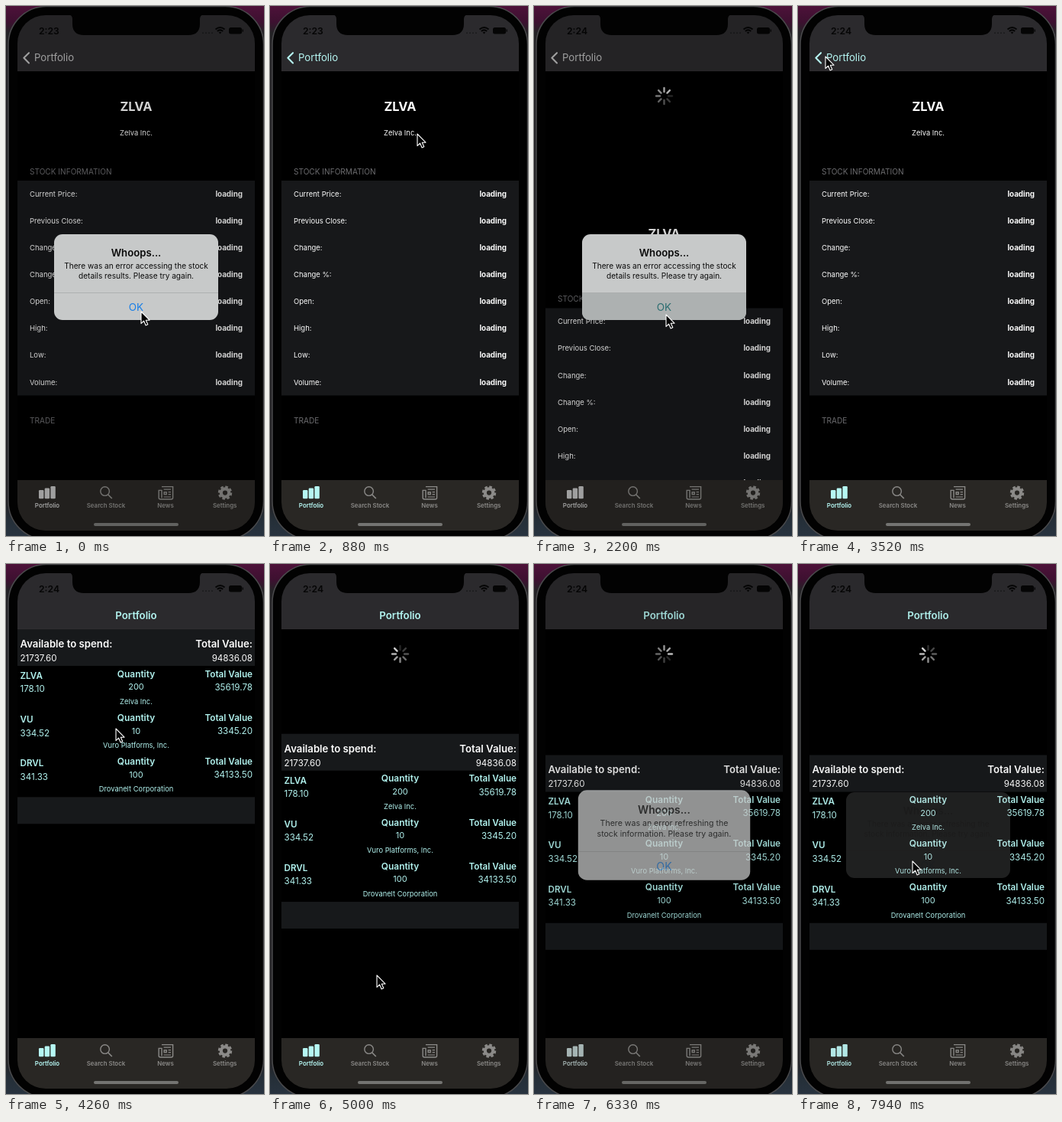
Animation of 338 by 692 pixels, one loop 8000 ms. Source, as an HTML page:

```html
<!DOCTYPE html>
<html lang="en">
<head>
<meta charset="utf-8">
<title>Stock portfolio</title>
<style>
  html, body { margin: 0; width: 100%; height: 100%; overflow: hidden; background: #000; }
  svg { display: block; width: 338px; height: 692px; --tint: #b6f7f3; }
  text { font-family: Inter, "Open Sans", sans-serif; fill: #fcfcfc; white-space: pre; }
  .mid { text-anchor: middle; }
  .end { text-anchor: end; }
  .semi { font-weight: 600; }
  .bold { font-weight: 700; }
  .cyan { fill: #b2f3ef; }
  .dark { fill: #0b0b0b; }
  .muted { fill: #6d6d70; }
  .idle { fill: #8b8a88; }
  .tint { fill: var(--tint); }
  .line { fill: none; stroke: #8b8a88; stroke-width: 1.4; }
</style>
</head>
<body>
<svg viewBox="0 0 338 692">
  <defs>
    <linearGradient id="wall" x2="0" y2="1">
      <stop offset="0" stop-color="#4d1239"/>
      <stop offset=".03" stop-color="#3d1030"/>
      <stop offset=".05" stop-color="#242326"/>
      <stop offset=".94" stop-color="#242326"/>
      <stop offset=".97" stop-color="#252f38"/>
      <stop offset="1" stop-color="#28333f"/>
    </linearGradient>
    <clipPath id="screen"><rect x="15" y="12" width="311" height="673" rx="37"/></clipPath>
  </defs>

  <rect width="338" height="692" fill="url(#wall)"/>
  <rect x="3" y=".5" width="334.5" height="696" rx="50" fill="#020202" stroke="#4a4a4c" stroke-width="1.5"/>

  <g clip-path="url(#screen)">
    <rect x="15" y="12" width="311" height="673"/>
    <g id="portfolio"></g>
    <g id="detail"></g>
    <g id="spinner" transform="translate(170.5 117.5)"></g>

    <rect x="15" y="12" width="311" height="73" fill="#2b2a2d"/>
    <path d="M15 84.8H326" stroke="#3a393b" stroke-width=".5"/>
    <g id="back">
      <path d="M30 61.2L23.4 67.8L30 74.4" fill="none" stroke="var(--tint)" stroke-width="2.1" stroke-linecap="round" stroke-linejoin="round"/>
      <text class="tint" x="37" y="72.4" font-size="13.2">Portfolio</text>
    </g>
    <text id="title" class="mid semi cyan" y="72.4" font-size="13.3">Portfolio</text>

    <text id="clock" class="semi" x="43" y="36.8" font-size="12.2" style="fill:#050505"></text>
    <path d="M257 35.3H271" stroke="#1a1a1c" stroke-width="1.4" stroke-dasharray="2 2"/>
    <g fill="none" stroke="#050505" stroke-width="2">
      <path d="M274.5 30.6Q280.5 25.4 286.5 30.6M276.8 33Q280.5 29.8 284.2 33"/>
      <path d="M280.5 36.4L278.7 34.4Q280.5 33.2 282.3 34.4Z" fill="#050505" stroke="none"/>
    </g>
    <rect x="292" y="28" width="17" height="8.4" rx="2.5" fill="#050505"/>
    <path d="M310.2 30.6v3.2" stroke="#050505" stroke-width="1.3"/>

    <rect x="15" y="619" width="311" height="66" fill="#292724"/>
    <g class="tint">
      <rect x="43" y="632" width="6.4" height="11.2" rx="1.3"/>
      <rect x="50.7" y="629.4" width="6.4" height="13.8" rx="1.3"/>
      <rect x="58.4" y="627" width="6.4" height="16.2" rx="1.3"/>
    </g>
    <g class="line">
      <circle cx="129.6" cy="633.6" r="5.8"/>
      <path d="M133.8 638L138.8 643" stroke-width="1.7"/>
      <path d="M204 627.6H218.6V642Q218.6 644 216.6 644H202.2Q200.2 644 200.2 642V632.4H204V642.2"/>
      <path d="M206.6 631.2H216M206.6 641H216M212.6 634.6H216M212.6 637.7H216" stroke-width="1.2"/>
      <rect x="207.2" y="634.8" width="3" height="2.8"/>
      <circle cx="287" cy="635.6" r="5.2" stroke-width="4.2"/>
      <circle cx="287" cy="635.6" r="7.9" stroke-width="2.6" stroke-dasharray="3.6 2.605"/>
    </g>
    <g id="tabs"></g>
    <rect x="115" y="675" width="111" height="4" rx="2" fill="#747472"/>

    <rect id="dim" x="15" y="12" width="311" height="673"/>
  </g>

  <path d="M82 11H259Q254 12 254 17V23Q254 38 239 38H102Q87 38 87 23V17Q87 12 82 11Z" fill="#020202"/>

  <g id="alert">
    <rect x="63" y="298" width="215" height="112" rx="11" fill="#c7c9c9"/>
    <g id="content">
      <path id="press" d="M63 374.5H278V399Q278 410 267 410H74Q63 410 63 399Z" fill="#adb1b1"/>
      <path d="M63 374.5H278" stroke="#a9abab" stroke-width=".8"/>
      <text class="mid semi dark" x="170.5" y="327" font-size="13.2">Whoops...</text>
      <text id="line1" class="mid dark" x="170.5" y="342.8" font-size="10.1"></text>
      <text id="line2" class="mid dark" x="170.5" y="355.8" font-size="10.1"></text>
      <text id="ok" class="mid" x="170.5" y="398" font-size="13.5">OK</text>
    </g>
  </g>

  <path id="cursor" d="M0 0V15.6L3.6 12.2L6.1 18L8.8 16.8L6.3 11.2H11Z" fill="#050505" stroke="#fff" stroke-width="1.1" stroke-linejoin="round"/>
</svg>

<script>
const $ = id => document.getElementById(id);
const text = (x, y, size, cls, str) =>
  `<text x="${x}" y="${y}" font-size="${size}" class="${cls}">${str}</text>`;
const panel = (y, height, fill) =>
  `<rect x="15" y="${y}" width="311" height="${height}" fill="${fill}"/>`;

function buildDetail() {
  const labels = ['Current Price', 'Previous Close', 'Change', 'Change %', 'Open', 'High', 'Low', 'Volume'];
  const rows = labels.map((label, i) =>
    text(31, 248.8 + i * 35.1, 9.5, '', label + ':') +
    text(310, 248.8 + i * 35.1, 9.8, 'end bold', 'loading'));
  $('detail').innerHTML = panel(85, 600, '#000') + '<g class="scroll">' +
    text(170.5, 136.6, 16.4, 'mid bold', 'ZLVA') +
    text(170.5, 169.2, 9.4, 'mid', 'Zelva Inc.') +
    text(31, 219.8, 10.1, 'muted', 'STOCK INFORMATION') +
    panel(228, 280.5, '#17181a') + rows.join('') +
    text(31, 545.2, 10.1, 'muted', 'TRADE') + '</g>';
}

function buildPortfolio() {
  const stocks = [
    ['ZLVA', '178.10', '200', '35619.78', 'Zelva Inc.'],
    ['VU', '334.52', '10', '3345.20', 'Vuro Platforms, Inc.'],
    ['DRVL', '341.33', '100', '34133.50', 'Drovanelt Corporation']
  ];
  const rows = stocks.map(([ticker, price, count, total, name], i) => {
    const y = 133 + i * 57.2;
    return text(18.5, y + 16.8, 11.7, 'semi cyan', ticker) +
      text(18.5, y + 34.3, 11.6, 'cyan', price) +
      text(170.5, y + 14.6, 11.9, 'mid semi cyan', 'Quantity') +
      text(170.5, y + 31.3, 11, 'mid cyan', count) +
      text(323, y + 14.6, 11.7, 'end semi cyan', 'Total Value') +
      text(323, y + 32, 11.6, 'end cyan', total) +
      text(170.5, y + 49.8, 9.35, 'mid cyan', name);
  });
  $('portfolio').innerHTML = '<g class="scroll">' + panel(85, 48, '#17191b') +
    text(18.5, 108.8, 13.2, 'semi', 'Available to spend:') +
    text(323, 108.8, 13.2, 'end semi', 'Total Value:') +
    text(18.5, 126.8, 11.6, '', '21737.60') +
    text(323, 126.8, 11.6, 'end', '94836.08') +
    rows.join('') + panel(304.3, 35, '#17191b') + '</g>';
}

function buildChrome() {
  $('tabs').innerHTML = [['Portfolio', 54, 'tint'], ['Search Stock', 131, 'idle'],
    ['News', 209, 'idle'], ['Settings', 286.7, 'idle']]
    .map(([name, x, cls]) => text(x, 655, 7.9, 'mid semi ' + cls, name)).join('');
  $('spinner').innerHTML = Array.from({ length: 8 }, (_, i) =>
    `<path d="M0 -5.6V-10.4" stroke="#d8d8d8" stroke-width="2.5" stroke-linecap="round" transform="rotate(${i * 45})"/>`).join('');
}

// Eased value of a [time, value] list.
function at(t, keys) {
  const next = keys.findIndex(k => k[0] > t);
  if (next < 0) return keys[keys.length - 1][1];
  if (next === 0) return keys[0][1];
  const [t0, a] = keys[next - 1], [t1, b] = keys[next];
  const u = (t - t0) / (t1 - t0);
  return a + (b - a) * u * u * (3 - 2 * u);
}

// Scroll distance for a drag past the top edge.
const rubber = drag => 600 - 600 / (drag * .55 / 600 + 1);

const detailDrag = [[1150, 0], [1770, 419], [2760, 419], [3080, 0]];
const listDrag = [[4540, 0], [4960, 322], [5050, 322], [5400, 0], [5560, 0], [5586, 2], [6240, 412]];
const alertFade = [[290, 1], [590, 0], [1760, 0], [2060, 1], [2360, 1], [2700, 0],
  [6180, 0], [6394, 1], [7650, 1], [8035, 0]];
const popKeys = [[3600, 0], [4120, 1]];
const pointer = [[0, 177, 399], [400, 177, 399], [882, 193, 167], [1150, 190, 160], [1770, 180, 579],
  [2150, 173, 403], [2600, 173, 403], [3380, 36, 66], [3680, 36, 66], [4230, 144, 215], [4540, 144, 215],
  [4960, 140, 537], [5050, 140, 537], [5560, 119, 312], [5586, 119, 312], [6240, 132, 724],
  [6340, 132, 724], [6780, 160, 392], [7350, 150, 388]];
const pointerX = pointer.map(([t, x]) => [t, x]);
const pointerY = pointer.map(([t, , y]) => [t, y]);
const presses = [[140, 290], [2190, 2360], [7490, 7640]];
const messages = {
  detail: ['There was an error accessing the stock', 'details results. Please try again.'],
  list: ['There was an error refreshing the', 'stock information. Please try again.']
};

function draw(t) {
  const pop = at(t, popKeys);
  const fade = at(t, alertFade);
  const detailPull = rubber(at(t, detailDrag));
  const listPull = rubber(at(t, listDrag));
  const pull = Math.max(detailPull, listPull);

  $('detail').setAttribute('transform', `translate(${311 * pop} 0)`);
  $('portfolio').setAttribute('transform', `translate(${-93 * (1 - pop)} 0)`);
  $('portfolio').style.display = pop > 0 ? '' : 'none';
  $('detail').querySelector('.scroll').setAttribute('transform', `translate(0 ${detailPull})`);
  $('portfolio').querySelector('.scroll').setAttribute('transform', `translate(0 ${listPull})`);

  $('back').setAttribute('opacity', 1 - pop);
  $('title').setAttribute('opacity', pop);
  $('title').setAttribute('x', 62 + 108.5 * pop);
  $('clock').textContent = t < 1760 ? '2:23' : '2:24';

  $('spinner').setAttribute('opacity', Math.min(1, Math.max(0, (pull - 50) / 70)));
  const head = t / 125 - .4;
  [...$('spinner').children].forEach((spoke, i) => {
    const age = ((head - i) % 8 + 8) % 8;
    spoke.setAttribute('opacity', 1 - .11 * age);
  });

  const pressed = presses.some(([from, to]) => t >= from && t < to);
  const [first, second] = t < 4000 ? messages.detail : messages.list;
  $('line1').textContent = first;
  $('line2').textContent = second;
  $('press').setAttribute('opacity', pressed ? 1 : 0);
  $('ok').style.fill = pressed ? '#2b6d70' : '#1a7fe6';

  const arriving = (t > 1700 && t < 2200) || (t > 6100 && t < 6700);
  const scale = arriving ? 1 + .18 * (1 - fade) : 1;
  $('alert').setAttribute('opacity', fade);
  $('content').setAttribute('opacity', fade);
  $('alert').setAttribute('transform', `translate(170.5 354) scale(${scale}) translate(-170.5 -354)`);
  $('dim').setAttribute('opacity', .17 * fade);
  document.querySelector('svg').style.setProperty('--tint',
    `color-mix(in srgb, #bfbfbf ${100 * fade}%, #b6f7f3)`);

  $('cursor').setAttribute('transform', `translate(${at(t, pointerX)} ${at(t, pointerY)})`);
}

buildDetail();
buildPortfolio();
buildChrome();

// The screen refreshes at a coarse, fixed step.
const LOOP = 8000, STEP = 147;
const start = performance.now();
function tick() {
  const t = (performance.now() - start) % LOOP;
  draw(Math.floor((t + 6) / STEP) * STEP);
  requestAnimationFrame(tick);
}
tick();
</script>
</body>
</html>
```
